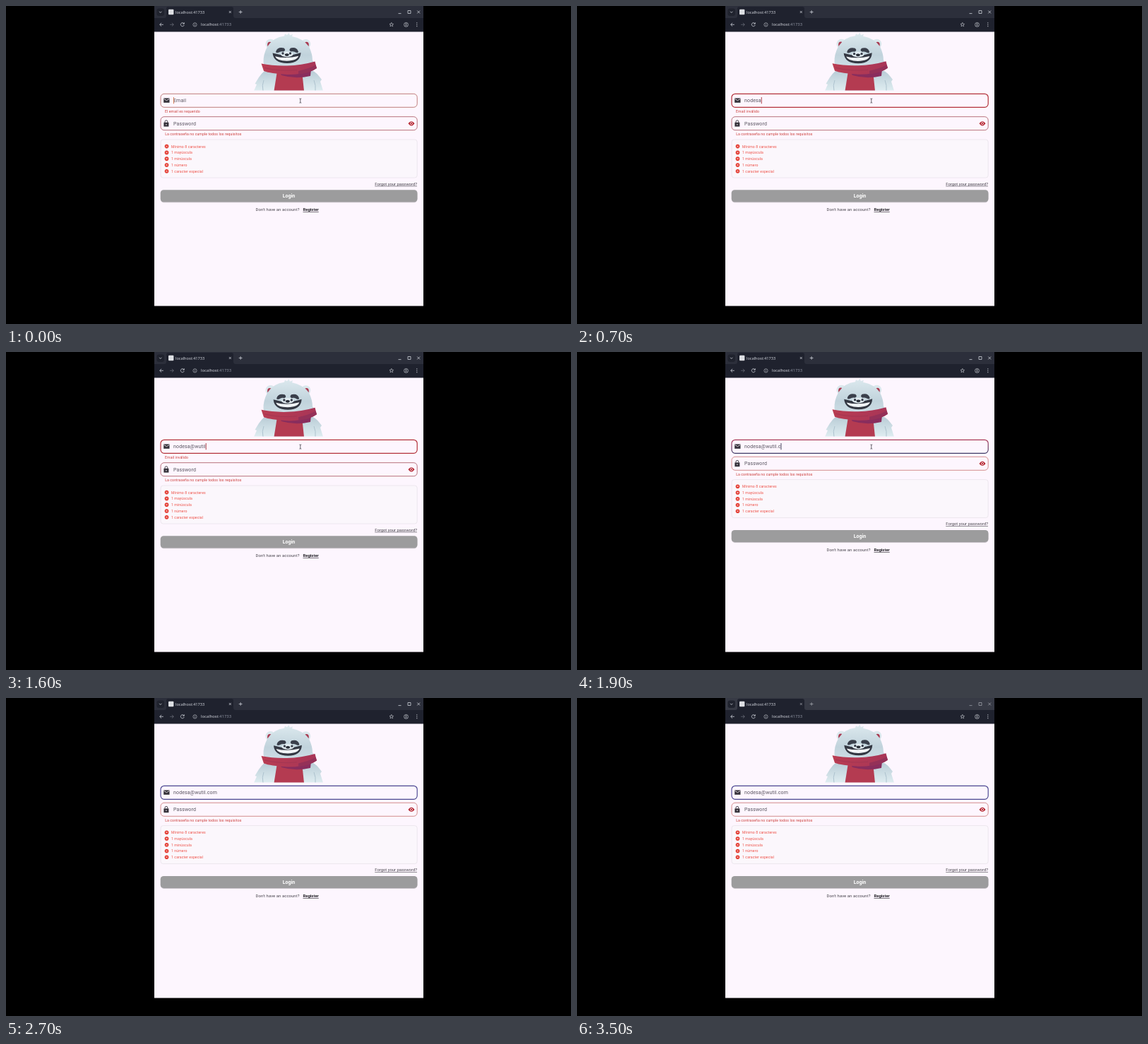
An HTML page for the animation above (3600 ms loop, 800 px wide and 450 px high).

```html
<!DOCTYPE html>
<html lang="es">
<head>
<meta charset="utf-8">
<title>Login</title>
<style>
html, body { margin: 0; width: 100%; height: 100%; overflow: hidden; background: #000; }
svg { display: block; width: 800px; height: 450px; }
text { font-family: Roboto, Arial, sans-serif; white-space: pre; }
.ui { font-family: "Noto Sans", sans-serif; fill: #d0d3db; }
.field { font-size: 7px; letter-spacing: .14px; fill: #5a5560; }
.small { font-size: 5.15px; letter-spacing: .1px; }
.error { fill: #cc3f3a; }
.rule { fill: #ee5148; }
.link { font-size: 5.9px; fill: #45424a; }
.under { text-decoration: underline; text-decoration-thickness: .5px; }
.line { fill: none; stroke: #d0d3db; stroke-width: .8; }
.thin { stroke-width: .6; }
.box { fill: none; }
</style>
</head>
<body>
<svg viewBox="0 0 800 450">
  <defs>
    <linearGradient id="fur" x1="0" y1="0" x2="0" y2="1">
      <stop offset="0" stop-color="#dce9ee"/><stop offset=".55" stop-color="#c1d3dc"/><stop offset="1" stop-color="#d3e3ea"/>
    </linearGradient>
    <linearGradient id="coat" x1="0" y1="0" x2="0" y2="1">
      <stop offset="0" stop-color="#b3c7d2"/><stop offset="1" stop-color="#dfedf1"/>
    </linearGradient>
    <linearGradient id="wool" x1="0" y1="0" x2="1" y2="0">
      <stop offset="0" stop-color="#b93d52"/><stop offset="1" stop-color="#a83557"/>
    </linearGradient>
    <linearGradient id="blend" x1="0" y1="0" x2="0" y2="1">
      <stop offset="0" stop-color="#ab3a58"/><stop offset="1" stop-color="#3d3a66"/>
    </linearGradient>
    <clipPath id="bust"><rect x="340" y="36" width="120" height="83.5"/></clipPath>
  </defs>

  <rect x="210" width="381" height="424.500" fill="#fdf6fe"/>
  <rect id="bar" x="210" width="381" height="19"/>
  <path d="M210 36.500V17H224q3 0 3-3V4q0-3 3-3h89q3 0 3 3v10q0 3 3 3h266v19.500z" fill="#1f222e"/>
  <rect x="213.500" y="3.500" width="10.500" height="10.500" rx="3" fill="#20232e"/>
  <path class="line" d="M217 7.800l1.700 1.700 1.700-1.700"/>
  <rect x="230" y="4.800" width="7.400" height="7.400" rx="1" fill="#dddfe3"/>
  <text class="ui" x="240" y="10.500" font-size="5.600">localhost:41733</text>
  <path id="chrome" class="line" d="M315.800 7l3 3m0-3l-3 3M329.700 8.500h4.800m-2.400-2.400v4.800M555.500 10.600h4M569 6.500h4v4h-4zM582.300 6.600l3.800 3.800m0-3.800l-3.800 3.800"/>
  <path class="line" d="M222.800 26.300h-5m2.300-2.400l-2.400 2.400 2.400 2.400"/>
  <path class="line" d="M232.200 26.300h5m-2.300-2.400l2.400 2.400-2.400 2.400" stroke-opacity=".4"/>
  <path class="line" d="M252 25a2.500 2.500 0 1 0 .2 2M252.300 23.300v2h-2"/>
  <path class="line thin" d="M264.900 26.400a2.600 2.600 0 1 0 5.200 0a2.600 2.600 0 1 0-5.200 0M267.500 26v1.700m0-3v.6"/>
  <text class="ui" x="276" y="28.400" font-size="5.850">localhost<tspan fill="#8f94a2">:41733</tspan></text>
  <path class="line thin" d="M545.800 23.400l.8 1.900 2 .2-1.500 1.300.5 2-1.800-1.100-1.800 1.100.5-2-1.500-1.300 2-.2z"/>
  <g class="line thin" stroke="#a8b6dc"><circle cx="566.500" cy="26.400" r="3"/><circle cx="566.500" cy="25.500" r="1"/><path d="M564.500 28.400q2-1.700 4 0"/></g>
  <path d="M581.800 23.900h.01m0 2.400h.01m0 2.400h.01" stroke="#d0d3db" stroke-width="1.200" stroke-linecap="round"/>

  <g clip-path="url(#bust)">
    <path fill="url(#coat)" d="M351 120L355 111 352.500 110 358 101Q364 91 377 87H424Q438 92 443 99L447 104 445 107 449 120Z"/>
    <path d="M364 120q-2-8 1-15M438 120q1-8-2-15" fill="none" stroke="#adc2ce"/>
    <g id="head">
      <circle cx="374.500" cy="53.800" r="7" fill="#dbe8ed"/><circle cx="424.500" cy="53.800" r="6.800" fill="#dbe8ed"/>
      <ellipse cx="373.500" cy="55" rx="3.400" ry="4.300" fill="#a83b52"/><ellipse cx="425.500" cy="55" rx="3.300" ry="4.200" fill="#a83b52"/>
      <path fill="url(#fur)" d="M366 90L363.500 86 366 84.500 364.500 80Q364 69 370 57.500Q379 44 394 42.500L395 39.500 398 41 400.500 38 402 41.500 406 40 405 43Q421 46 429 57.500Q434 68 434 77L437 81 434 83 435 88Q420 95 400 95Q378 95 366 90Z"/>
      <g id="face">
        <path d="M378.500 66.500Q388 69.500 398 69.500T418.500 66Q418 80.500 399 81Q380 81 378.500 66.500Z" fill="#343843"/>
        <path d="M382 71.200Q398 75.200 415.200 70.700Q413.500 77 398.500 77.700Q384.500 77.700 382 71.200Z" fill="#f0f4f6"/>
        <path d="M383 65Q385 57.500 394.500 59.500Q398 62.500 394 64.500Q390 63.500 387 65.800Q384 67 383 65Z" fill="#3a3f4b"/>
        <path d="M415 65Q413 57.500 404 59.500Q400.500 62.500 404.500 64.500Q408.500 63.500 411.500 65.800Q414 67 415 65Z" fill="#3a3f4b"/>
        <ellipse cx="398.700" cy="68.300" rx="8.800" ry="3.900" fill="#e1ebf0"/>
        <g id="eyes" fill="#343a47"><circle cx="393.500" cy="67" r="1.700"/><circle cx="404" cy="67" r="1.700"/></g>
        <path d="M395.500 68.500q3-2.300 6.500 0q-.7 2.600-3.300 2.600t-3.200-2.600z" fill="#272c36"/>
      </g>
    </g>
    <path d="M384 92H419L422 120H379.500Z" fill="#b43b51"/>
    <path d="M388 95Q410 98 432 90L431 99Q410 104 390 98Z" fill="#892d5d"/>
    <g id="scarf">
      <path d="M361.500 81.500Q378 85 398 84.500T437.500 78.500L440 88 435 91Q418 97.500 398 97Q374 95.500 365 92Z" fill="url(#wool)"/>
      <path d="M366 87.500Q388 93 412 90.500" fill="none" stroke="#9f3552" stroke-width=".8"/>
      <path d="M414 92Q428 89 438.500 83.500L440 88 435 91Q426 95.500 414 96.500Z" fill="#943158"/>
    </g>
  </g>

  <rect id="email" class="box" x="219" y="124.300" width="363.200" height="19" rx="5"/>
  <path d="M223.200 130.400h8.300v6.400h-8.300z" fill="#35323a"/>
  <path d="M223.500 131.300l3.900 2.500 3.900-2.500" fill="none" stroke="#fdf6fe" stroke-width=".8"/>
  <text id="value" class="field" x="237" y="136"></text>
  <rect id="caret" y="129" width=".9" height="9.300"/>
  <text id="mailError" class="small error" x="225" y="150.600"></text>

  <g id="form">
    <rect id="pass" class="box" x="219" y="156.700" width="363.200" height="19" rx="5" stroke-width=".9"/>
    <path d="M223.400 164.800h7v5.800h-7z" fill="#35323a"/>
    <path d="M225 165v-1.300a1.900 1.900 0 0 1 3.800 0v1.300" fill="none" stroke="#35323a" stroke-width=".9"/>
    <circle cx="226.900" cy="167.700" r=".8" fill="#fdf6fe"/>
    <text class="field" x="237" y="168.500">Password</text>
    <path d="M569.500 166.300q4.500-6.200 9 0q-4.500 6.200-9 0z" fill="#b3202a"/>
    <circle cx="574" cy="166.300" r="1.600" fill="#b3202a" stroke="#fdf6fe" stroke-width=".8"/>
    <text class="small error" x="225.200" y="183">La contraseña no cumple todos los requisitos</text>
    <rect x="219" y="189" width="363.200" height="54" rx="3.500" fill="#fbf7fc" stroke="#e9e2ea" stroke-width=".8"/>
    <g id="rules"></g>
    <text class="link under" x="582" y="253.700" text-anchor="end">Forgot your password?</text>
    <rect x="219" y="261.300" width="363.300" height="17" rx="4.500" fill="#cbc5cc"/>
    <rect x="218.700" y="260.300" width="363.800" height="17" rx="4.500" fill="#9c9c9d"/>
    <text x="400.500" y="271.300" font-size="7" font-weight="700" fill="#fff" text-anchor="middle">Login</text>
    <text class="link" x="353.500" y="290.400" letter-spacing=".08">Don't have an account?</text>
    <text class="link under" x="420.500" y="290.400" font-weight="700" style="fill:#222026">Register</text>
  </g>

  <path id="beam" d="M415.400 131q1.400 0 1.400.8v4.600q0 .8-1.400.8m2.800-6.200q-1.400 0-1.400.8m0 4.600q0 .8 1.400.8" fill="none" stroke="#3f3c44" stroke-width=".8"/>
  <path id="arrow" d="M0 0v9l2.200-2 1.500 3.400 1.500-.7-1.500-3.200h3z" fill="#111" stroke="#eee" stroke-width=".6"/>
</svg>
<script>
const $ = id => document.getElementById(id);
const set = (el, attrs) => { for (const k in attrs) el.setAttribute(k, attrs[k]); };
const show = (el, on) => el.setAttribute("visibility", on ? "visible" : "hidden");

const LOOP = 3600, STEP = 100;
const MAIL = "nodesa@wutil.com";
// When each character is typed, in ms
const KEYS = [100, 200, 300, 400, 500, 600, 1000, 1100, 1300, 1400, 1500, 1600, 1800, 1900, 2000, 2100];
const ARROW = { 2500: [500, 262], 2600: [589, 404], 3200: [589, 304] };
const VALID = 1900, BLUR = 3400;

const labels = ["Mínimo 8 caracteres", "1 mayúscula", "1 minúscula", "1 número", "1 caracter especial"];
$("rules").innerHTML = labels.map((label, i) => {
  const y = 198.6 + i * 8.78;
  return `<circle cx="227.500" cy="${y}" r="2.800" fill="#e3392f"/>
    <path d="M226.500 ${y - 1}l2 2m0-2l-2 2" stroke="#fff" stroke-width=".7"/>
    <text class="small rule" x="234" y="${y + 1.9}">${label}</text>`;
}).join("");

function mailBorder(t) {
  if (t < 100) return ["#b9706c", .9];
  if (t < VALID) return ["#b3323a", 1.2];
  return [t < VALID + STEP ? "url(#blend)" : "#4a4590", 1.15];
}

function caretOn(t) {
  if (t >= BLUR) return false;
  const last = KEYS.filter(k => k <= t).pop() || 0;
  return (t - last) % 1000 < 500;
}

function draw(now) {
  const t = Math.floor((now % LOOP) / STEP) * STEP;
  const typed = MAIL.slice(0, KEYS.filter(k => k <= t).length);
  const valid = t >= VALID;

  $("value").textContent = typed || "Email";
  const end = typed ? $("value").getComputedTextLength() : 0;
  set($("caret"), { x: 237 + end, fill: !typed ? "#d07048" : valid ? "#37324e" : "#a52c34" });
  show($("caret"), caretOn(t));

  const [stroke, width] = mailBorder(t);
  set($("email"), { stroke, "stroke-width": width });
  $("mailError").textContent = valid ? "" : typed ? "Email inválido" : "El email es requerido";
  set($("form"), { transform: `translate(0 ${valid ? -8.4 : 0})` });
  set($("pass"), { stroke: valid ? "#d08380" : "#b0646e" });

  // Gentle idle sway; the eyes follow the text
  const sway = Math.sin(t / LOOP * Math.PI * 6);
  set($("head"), { transform: `translate(0 ${sway * .3})` });
  set($("face"), { transform: `translate(${-1 + typed.length / 16 + sway * .4} ${typed ? .4 : 0})` });
  set($("eyes"), { transform: `translate(${typed.length / 16 - .5} ${typed ? .4 : 0})` });
  set($("scarf"), { transform: `translate(0 ${sway * .4})` });

  show($("beam"), t < 2500);
  const spot = ARROW[t];
  show($("arrow"), spot);
  if (spot) set($("arrow"), { transform: `translate(${spot})` });

  set($("bar"), { fill: t >= BLUR ? "#373a45" : "#2c2f3b" });
  set($("chrome"), { opacity: t >= BLUR ? .65 : 1 });
}

const start = performance.now();
function tick() {
  draw(performance.now() - start);
  requestAnimationFrame(tick);
}
tick();
</script>
</body>
</html>
```
